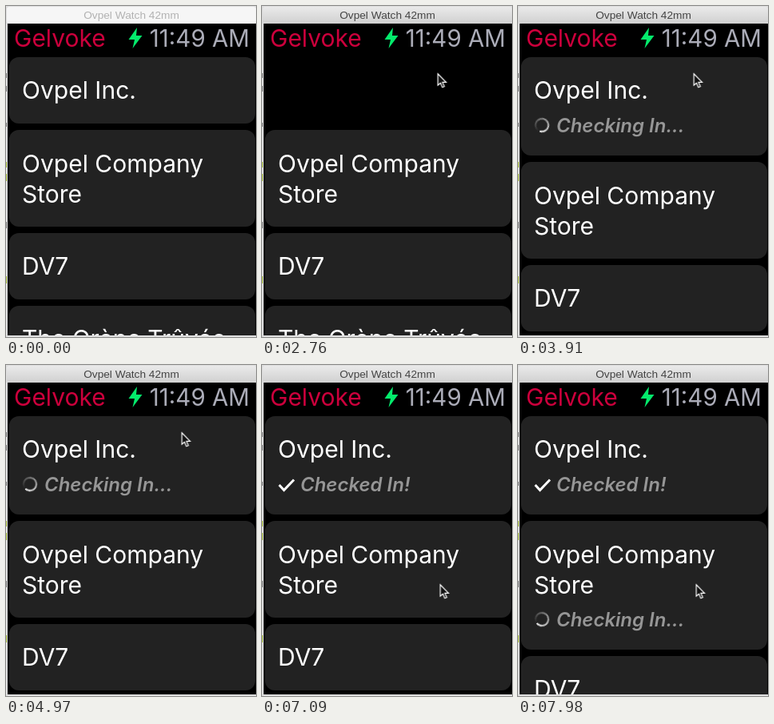
An HTML page that plays this animation: 313 by 414 pixels, repeating every 8 s.

```html
<!DOCTYPE html>
<html lang="en">
<head>
<meta charset="utf-8">
<title>Check-in list</title>
<style>
  html, body { margin: 0; width: 100%; height: 100%; overflow: hidden; background: #000; }
  svg { display: block; width: 313px; height: 414px; }
  text { font: 400 30px Inter, Roboto, sans-serif; font-optical-sizing: none; fill: #fff; }
  .title text { font: 13.7px "Liberation Sans", Arial, sans-serif; text-anchor: middle; }
  .note { font-size: 24px; font-style: italic; font-weight: 600; fill: #969696; }
  .card { fill: #222; }
  .spinner { transform-origin: 30px 149px; }
</style>
</head>
<body>
<svg viewBox="0 0 313 414">
  <defs>
    <linearGradient id="bar" x2="0" y2="1">
      <stop stop-color="#eaeaea"/><stop offset="1" stop-color="#d0d0d0"/>
    </linearGradient>
    <clipPath id="screen"><rect x="2" y="22" width="311" height="390"/></clipPath>
  </defs>

  <rect width="313" height="414" fill="#dedede"/>
  <path d="M.5 84v6M.5 100v7M.5 146v5M.5 270v8" stroke="#777"/>
  <path d="M.5 195v7M.5 210v9M.5 338v9" stroke="#9db52c"/>
  <rect x="2" y="22" width="311" height="390"/>

  <g class="title" id="idle">
    <rect x="1" y="1" width="312" height="21" rx="3" fill="#f6f6f6"/>
    <text x="157" y="16" style="fill:#b2b2b2">Ovpel Watch 42mm</text>
  </g>
  <g class="title" id="active">
    <rect x="1" y="1" width="312" height="21" rx="3" fill="url(#bar)"/>
    <text x="157" y="16" style="fill:#444">Ovpel Watch 42mm</text>
  </g>

  <text x="10" y="51" style="fill:#cc003c">Gelvoke</text>
  <path d="M164 27L153.500 42H161L158.500 53L170.500 37H163Z" fill="#04eb6c"/>
  <text x="305" y="51" text-anchor="end" style="fill:#abacb8;font-size:29.500px">11:49 AM</text>

  <g clip-path="url(#screen)">
    <g id="first">
      <rect class="card" x="4" y="64" width="308" height="83" rx="12"/>
      <text x="20" y="116">Ovpel Inc.</text>
    </g>
    <g id="firstOpen">
      <rect class="card" x="4" y="64" width="308" height="123" rx="12"/>
      <text x="20" y="116">Ovpel Inc.</text>
      <g id="checking">
        <g class="spinner"></g>
        <text class="note" x="48" y="158">Checking In...</text>
      </g>
      <g id="checked">
        <path d="M21.500 150L27.500 156.500L40 143.500" fill="none" stroke="#fff" stroke-width="3"/>
        <text class="note" x="48" y="158">Checked In!</text>
      </g>
    </g>
    <g id="second">
      <rect class="card" x="4" y="155" width="308" height="121" rx="12"/>
      <g id="secondLabel">
        <text x="20" y="208">Ovpel Company</text>
        <text x="20" y="246">Store</text>
      </g>
    </g>
    <g id="secondOpen">
      <rect class="card" x="4" y="195" width="308" height="161" rx="12"/>
      <text x="20" y="248">Ovpel Company</text>
      <text x="20" y="286">Store</text>
      <g transform="translate(0 169)">
        <g class="spinner"></g>
        <text class="note" x="48" y="158">Checking In...</text>
      </g>
    </g>
    <g id="rest">
      <rect class="card" x="4" y="284" width="308" height="83" rx="12"/>
      <text x="20" y="336">DV7</text>
      <rect class="card" x="4" y="375" width="308" height="83" rx="12"/>
      <text x="20" y="427">The Grène Trûvée</text>
    </g>
  </g>

  <path id="cursor" d="M.7 .8V15.200L4 12.200L6.300 17.800L8.800 16.700L6.500 11.300H11Z"
        fill="#111" stroke="#fff" stroke-width="1.200"/>
</svg>
<script>
// All motion is a function of the tick; the screen refreshes once per tick.
const LOOP = 8000, TICKS = 90, TICK_MS = 88.67, LEAD_MS = 10;
const ACTIVATE = 19, PRESS_1 = 27, OPEN_1 = 31, DONE_1 = 65, PRESS_2 = 83, OPEN_2 = 87;
const $ = id => document.getElementById(id);

function play(el, prop, valueAt) {
  const frames = [];
  for (let tick = 0; tick <= TICKS; tick++) {
    const time = Math.max(0, tick * TICK_MS - LEAD_MS);
    frames.push({ offset: time / LOOP, [prop]: valueAt(tick), easing: 'step-end' });
  }
  frames.push({ offset: 1, [prop]: valueAt(TICKS) });
  el.animate(frames, { duration: LOOP, iterations: Infinity });
}
const fade = (id, valueAt) => play($(id), 'opacity', valueAt);
const move = (id, x, y) => play($(id), 'transform', t => `translate(${x(t)}px, ${y(t)}px)`);

// Smooth rise from 0 to 1, by default over three ticks.
function ramp(tick, start, length = 3) {
  const p = Math.min(1, Math.max(0, (tick - start) / length));
  return p * p * (3 - 2 * p);
}
const pressed = (tick, start) =>
  tick >= start && tick < start + 2 ? 0.6 + 0.2 * (tick - start) : 1;

// A ring of short arcs that fades out behind its leading end.
function drawSpinner(spinner) {
  const count = 30;
  for (let i = 1; i < count; i++) {
    const arc = document.createElementNS('http://www.w3.org/2000/svg', 'circle');
    const style = {
      cx: 30, cy: 149, r: 8, fill: 'none', stroke: '#fff', 'stroke-width': 2.2, opacity: i / count,
      pathLength: count, 'stroke-dasharray': `1.05 ${count}`, transform: `rotate(${i * 360 / count - 90} 30 149)`
    };
    for (const name in style) arc.setAttribute(name, style[name]);
    spinner.append(arc);
  }
  play(spinner, 'transform', t => `rotate(${(t - 44) * 32 + 200}deg)`);
}
document.querySelectorAll('.spinner').forEach(drawSpinner);

fade('idle', t => t < ACTIVATE ? 1 : 0);
fade('active', t => t < ACTIVATE ? 0 : 1);

fade('first', t => t < OPEN_1 ? pressed(t, PRESS_1) : 0);
fade('firstOpen', t => ramp(t, OPEN_1));
fade('checking', t => 1 - ramp(t, DONE_1));
fade('checked', t => ramp(t, DONE_1));

fade('secondLabel', t => pressed(t, PRESS_2));
fade('second', t => t < OPEN_2 ? 1 : 0);
fade('secondOpen', t => ramp(t, OPEN_2));

move('second', () => 0, t => 40 * ramp(t, OPEN_1));
move('rest', () => 0, t => 40 * (ramp(t, OPEN_1) + ramp(t, OPEN_2)));

// The pointer enters, climbs to the first row, then drops to the second.
fade('cursor', t => t < 6 ? 0 : 1);
move('cursor',
  t => 211 + 15.5 * ramp(t, 6) - 7 * ramp(t, 11) + 3 * ramp(t, 72, 8),
  t => 329 - 152 * ramp(t, 6) - 93 * ramp(t, 11) + 190 * ramp(t, 72, 8));
</script>
</body>
</html>
```
